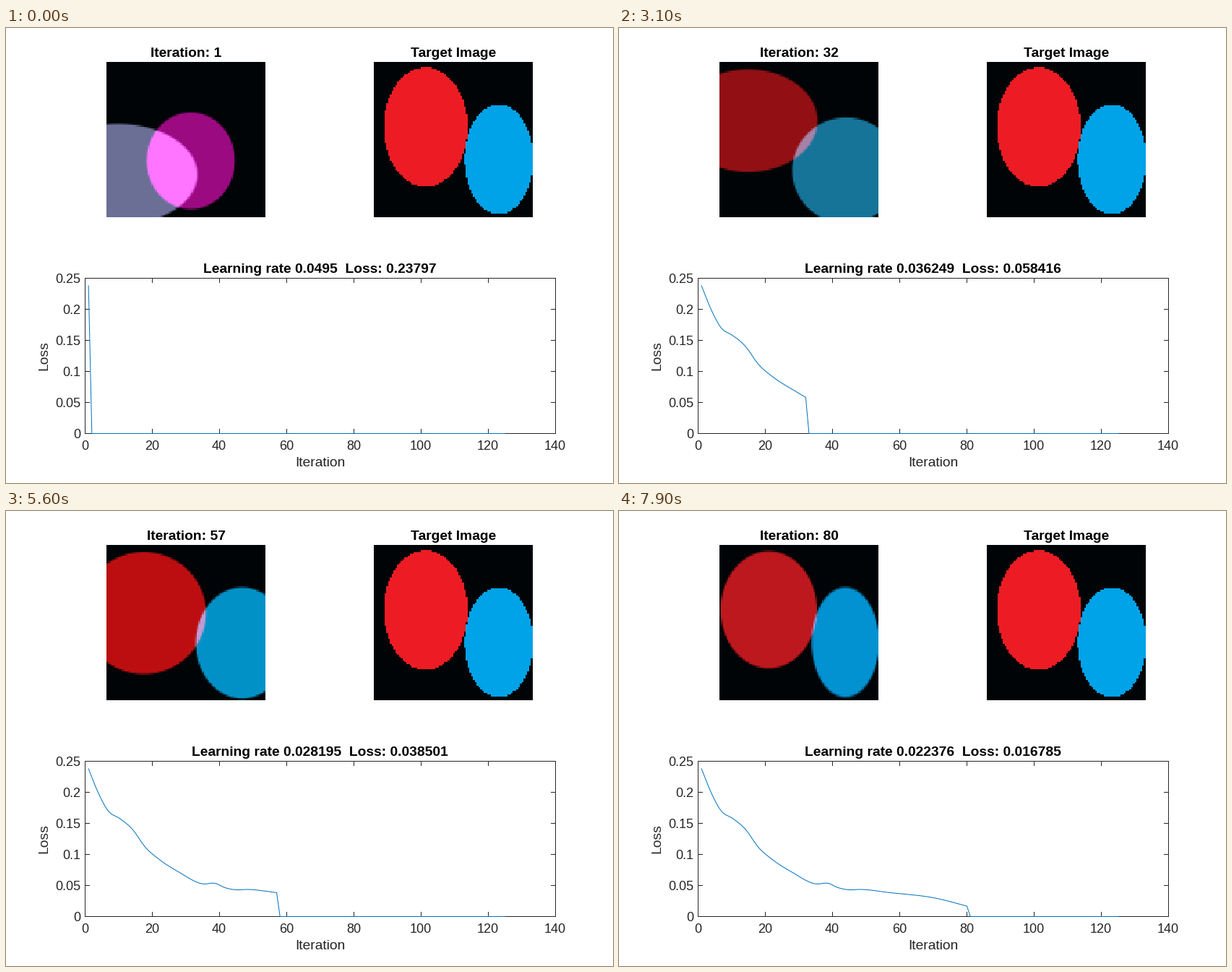
A matplotlib script that plays this animation: 840x630 px, repeating every 8 s.

```python
import numpy as np
import matplotlib.pyplot as plt
from matplotlib.animation import FuncAnimation

W, H, DPI = 840, 630, 100
FRAMES, INTERVAL, TOTAL = 80, 100, 125
COLS, ROWS, CELL = 88, 86, 2.5
LEFT, TOP, GAP = 139, 47, 370                 # image panels in pixels
X0, X1, Y0, Y1 = 109.5, 760.5, 346.5, 561.5   # plot box in pixels
INK = (0.15, 0.15, 0.15)
BACK = np.array([1, 4, 6])
RED, BLUE = (237, 28, 36), (0, 162, 232)

plt.rcParams["font.family"] = "Liberation Sans"

iters = np.arange(1, FRAMES + 1)
t = iters - 1


def smooth(keys, values):
    """Cubic Hermite curve through a few key values, at every iteration."""
    keys, values = np.array(keys, float), np.array(values, float)
    slope = np.gradient(values, keys)
    i = np.clip(np.searchsorted(keys, iters, "right") - 1, 0, len(keys) - 2)
    h = keys[i + 1] - keys[i]
    u = (iters - keys[i]) / h
    ease = u * u * (3 - 2 * u)
    return (values[i] * (1 - ease) + values[i + 1] * ease
            + h * u * (1 - u) * ((1 - u) * slope[i] - u * slope[i + 1]))


def fade(start, end, span, power):
    return end + (start - end) * np.exp(-(t / span) ** power)


def swing(start, end):
    return end + (start - end) * np.exp(-.04 * t) * np.cos(.06 * t)


# Centre x, centre y, radius x, radius y at the key iterations
KEYS = [1, 10, 22, 41, 57, 80]
first = [smooth(KEYS, v) for v in (
    [155, 145, 165, 188, 191, 207.5],
    [203, 177, 126, 142, 141.5, 137],
    [110, 90, 95, 94, 86, 66.5],
    [70, 64, 65.5, 77, 84.5, 81])]
second = [smooth(KEYS, v) for v in (
    [256, 302, 296, 332, 327, 313.5],
    [184, 147, 192.5, 191, 183, 182],
    [61, 61, 73, 72, 64, 46.5],
    [67, 65, 68.5, 77, 77, 76])]

first += [fade(107, 190, 36, 3), swing(111, 24), swing(150, 30)]
second += [fade(156, 2, 22, 2), fade(10, 146, 25, 2), fade(130, 210, 44, 3)]
first, second = np.transpose(first), np.transpose(second)

loss = smooth(
    [1, 4, 7, 10, 14, 18, 22, 28, 35, 39, 41, 45, 48, 57, 71, 80],
    [.23797, .198, .169, .1589, .141, .111, .092143, .0712, .0525, .0532,
     .04778, .043, .0436, .038501, .029215, .016785])

gx, gy = np.meshgrid(LEFT + (np.arange(COLS) + .5) * CELL,
                     TOP + (np.arange(ROWS) + .5) * CELL)


def inside(cx, cy, rx, ry):
    """Positive depth inside an ellipse, in cells."""
    return (1 - np.hypot((gx - cx) / rx, (gy - cy) / ry)) * min(rx, ry) / CELL


def blend(*shapes):
    """Add soft coloured ellipses together on the pixel grid."""
    img = np.tile(BACK.astype(float), (ROWS, COLS, 1))
    for s in shapes:
        mask = np.clip(inside(*s[:4]) + .5, 0, 1)
        img += mask[..., None] * (s[4:] - BACK)
    return np.clip(img, 0, 255).astype(np.uint8)


def goal():
    img = np.tile(BACK.astype(np.uint8), (ROWS, COLS, 1))
    img[inside(211, 137.5, 58, 82.5) > 0] = RED
    img[inside(312.5, 182, 47.5, 76) > 0] = BLUE
    return img


def px(x):
    return X0 + x * (X1 - X0) / 140


def py(y):
    return Y1 - y * (Y1 - Y0) / .25


fig = plt.figure(figsize=(W / DPI, H / DPI), dpi=DPI, facecolor="white")
ax = fig.add_axes([0, 0, 1, 1])


def label(x, y, s, size=18, ha="center", **kw):
    kw = {"color": INK, **kw}
    return ax.text(x, y, s, fontsize=size * 72 / DPI, ha=ha, va="baseline",
                   rotation_mode="anchor", **kw)


def title(x, y, s=""):
    return label(x, y, s, 19.3, color="black", weight="bold")


def show(img, x):
    return ax.imshow(img, extent=(x, x + COLS * CELL, TOP + ROWS * CELL, TOP),
                     interpolation="nearest", aspect="auto")


def stroke(xs, ys):
    ax.plot(xs, ys, color=INK, lw=.72, solid_capstyle="projecting",
            solid_joinstyle="miter", snap=False)


panel = show(blend(first[0], second[0]), LEFT)
show(goal(), LEFT + GAP)
ax.set(xlim=(0, W), ylim=(H, 0))
ax.axis("off")

stroke([X0, X1, X1, X0, X0], [Y0, Y0, Y1, Y1, Y0])
for v in range(0, 141, 20):
    x = px(v)
    stroke([x, x], [Y1, Y1 - 6])
    stroke([x, x], [Y0, Y0 + 6])
    label(x - .5, 584, str(v))
for v in np.arange(6) * .05:
    y = py(v)
    stroke([X0, X0 + 6], [y, y])
    stroke([X1, X1 - 6], [y, y])
    label(103.5, y + 6.5, f"{v:.2g}", ha="right")

label(434.5, 607, "Iteration", 19.3)
label(57.5, 453.5, "Loss", 19.3, rotation=90)
title(619.5, 40, "Target Image")
head = title(249.5, 40)
stats = title(434.5, 339)
curve, = ax.plot([], [], color=(0, .447, .741), lw=.72, snap=False)


def update(frame):
    n = frame + 1
    panel.set_data(blend(first[frame], second[frame]))
    head.set_text(f"Iteration: {n}")
    stats.set_text(f"Learning rate {.05 * .99 ** n:.5g}  Loss: {loss[frame]:.5g}")
    values = np.zeros(TOTAL)
    values[:n] = loss[:n]
    curve.set_data(px(np.arange(1, TOTAL + 1)), py(values))
    return panel, head, stats, curve


anim = FuncAnimation(fig, update, frames=FRAMES, interval=INTERVAL,
                     repeat=True, repeat_delay=0, blit=False)
plt.show()
```
